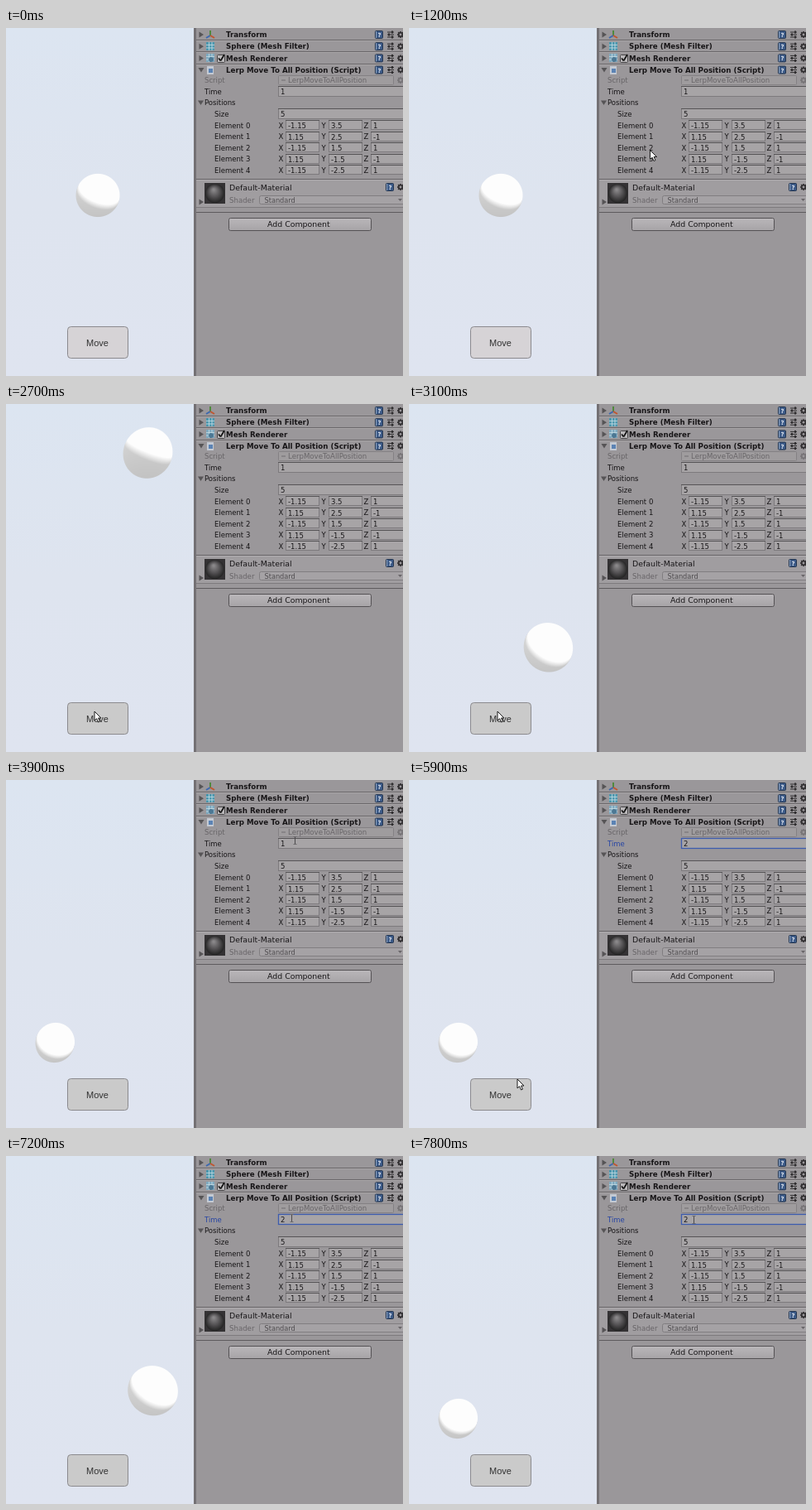
An HTML page with a canvas for the animation above (8000 ms loop, 480 by 420 pixels).

```html
<!DOCTYPE html>
<html lang="en">
<head>
<meta charset="utf-8">
<title>Inspector and moving ball</title>
<style>
  html, body { margin: 0; width: 100%; height: 100%; overflow: hidden; background: #dee4f0; }
  canvas { display: block; }
</style>
</head>
<body>
<canvas id="stage" width="480" height="420"></canvas>
<script>
const ctx = document.getElementById('stage').getContext('2d');
const LOOP = 8000, STEP = 100;
const SANS = '"DejaVu Sans", sans-serif';
const INK = '#171517', DIM = '#686568', PANEL = '#9a979a', BLUE = '#2846a4';

// Camera: focal lengths in pixels, screen centre and distance to the z = 0 plane
const VIEW = { fx: 423, fy: 416.6, cx: 113.5, cy: 200.9, dist: 8 };
const LIGHT = [0.32, 0.77, -0.56];
const START = [-0.047, -0.02, 0];
const POINTS = [[-1.15, 3.5, 1], [1.15, 2.5, -1], [-1.15, 1.5, 1], [1.15, -1.5, -1], [-1.15, -2.5, 1]];
const LAST = POINTS[POINTS.length - 1];
const RUNS = [
  { shown: 2300, begin: 2289, length: 990, from: START },
  { shown: 5900, begin: 5900, length: 1640, from: LAST }
];

// Pointer keys: time, x, y
const POINTER = [
  [400, 387, 200], [600, 300, 203], [800, 242, 215], [1000, 242, 215], [1400, 341, 80],
  [1600, 341, 80], [2200, 107, 371], [3100, 107, 371], [3400, 272, 76], [3600, 300, 58],
  [3900, 349, 73], [4400, 349, 73], [4800, 346, 77], [5400, 350, 77], [5900, 131, 361],
  [6200, 112, 378], [6800, 112, 378], [7200, 345, 75], [7800, 344, 77]
];

const clamp = (v, lo = 0, hi = 1) => Math.min(hi, Math.max(lo, v));
const mix = (a, b, f) => a + (b - a) * f;
const dot = (a, b) => a[0] * b[0] + a[1] * b[1] + a[2] * b[2];

function rect(x, y, w, h, fill) {
  ctx.fillStyle = fill;
  ctx.fillRect(x, y, w, h);
}

function text(str, x, y, size = 8.5, color = INK, weight = '', family = SANS) {
  ctx.font = `${weight} ${size}px ${family}`;
  ctx.fillStyle = color;
  ctx.fillText(str, x, y);
}

function shape(points, fill, stroke, width = 1) {
  ctx.beginPath();
  points.forEach(([x, y]) => ctx.lineTo(x, y));
  ctx.closePath();
  if (fill) { ctx.fillStyle = fill; ctx.fill(); }
  if (stroke) { ctx.strokeStyle = stroke; ctx.lineWidth = width; ctx.stroke(); }
}

function line(x1, y1, x2, y2, color, width = 1) {
  ctx.beginPath();
  ctx.moveTo(x1, y1);
  ctx.lineTo(x2, y2);
  ctx.strokeStyle = color;
  ctx.lineWidth = width;
  ctx.stroke();
}

function disc(x, y, r, fill) {
  ctx.beginPath();
  ctx.arc(x, y, r, 0, 7);
  ctx.fillStyle = fill;
  ctx.fill();
}

function roundBox(x, y, w, h, r, fill, stroke) {
  ctx.beginPath();
  ctx.roundRect(x + 0.5, y + 0.5, w - 1, h - 1, r);
  ctx.fillStyle = fill;
  ctx.fill();
  ctx.strokeStyle = stroke;
  ctx.lineWidth = 1;
  ctx.stroke();
}

function gradient(x0, y0, x1, y1, ...colors) {
  const g = ctx.createLinearGradient(x0, y0, x1, y1);
  colors.forEach((c, i) => g.addColorStop(i / (colors.length - 1), c));
  return g;
}

function ballPosition(t) {
  const run = RUNS.filter(r => t > r.shown).pop();
  if (!run) return START;
  const path = [run.from, ...POINTS];
  const p = clamp((t - run.begin) / run.length) * POINTS.length;
  const i = Math.min(Math.floor(p), POINTS.length - 1);
  return path[i].map((v, k) => mix(v, path[i + 1][k], p - i));
}

// Ray-traced sphere of radius 0.5 with a saturating directional light
function drawBall(pos) {
  const { fx, fy, cx, cy, dist } = VIEW;
  const depth = dist + pos[2];
  const sx = Math.round(cx + pos[0] * fx / depth);
  const sy = Math.round(cy - pos[1] * fy / depth);
  const oc = [-pos[0], -pos[1], -depth];
  const oc2 = dot(oc, oc);
  for (let y = sy - 34; y <= sy + 34; y++) {
    for (let x = sx - 34; x <= sx + 34; x++) {
      const ray = [(x + 0.5 - cx) / fx, (cy - y - 0.5) / fy, 1];
      const a = dot(ray, ray), b = dot(ray, oc);
      const miss = Math.sqrt(Math.max(0, oc2 - b * b / a));
      const alpha = clamp((0.5 - miss) * fx / depth + 0.5);
      if (!alpha) continue;
      const k = (-b - Math.sqrt(Math.max(0, b * b - a * (oc2 - 0.25)))) / a;
      const n = ray.map((v, i) => (oc[i] + v * k) * 2);
      const tone = Math.min(253, 208 + 13 * n[1] + 175 * Math.max(0, dot(n, LIGHT)));
      rect(x, y, 1, 1, `rgba(${tone},${tone},${tone},${alpha})`);
    }
  }
}

function foldArrow(x, y, open) {
  shape(open ? [[x - 3.5, y - 2.5], [x + 3.5, y - 2.5], [x, y + 3]]
             : [[x - 2.5, y - 3.5], [x + 3, y], [x - 2.5, y + 3.5]], '#565456');
}

function book(x, y) {
  roundBox(x - 5, y - 5, 10, 10, 1, '#3d5b88', '#22344f');
  line(x - 3.5, y - 4, x - 3.5, y + 4, '#93a9c6');
  text('?', x - 1.5, y + 3, 7, '#e1e7f0', 'bold');
}

function sliders(x, y) {
  [-3, 0, 3].forEach((dy, i) => {
    line(x - 4, y + dy, x + 4, y + dy, '#302e30');
    rect(x + [1, -3, 1][i], y + dy - 1.5, 2, 3, '#302e30');
  });
}

function gear(x, y, color = '#302e30') {
  for (let i = 0; i < 4; i++) {
    const c = Math.cos(i * Math.PI / 4) * 4, s = Math.sin(i * Math.PI / 4) * 4;
    line(x - c, y - s, x + c, y + s, color, 1.6);
  }
  disc(x, y, 3, color);
  disc(x, y, 1.4, PANEL);
}

function gridIcon(x, y, fill) {
  rect(x - 5, y - 5, 10, 10, fill);
  for (const d of [-1.5, 2]) {
    line(x - 5, y + d, x + 5, y + d, '#c5dce4', 0.8);
    line(x + d, y - 5, x + d, y + 5, '#c5dce4', 0.8);
  }
}

function field(x, y, w, value, h = 12) {
  rect(x, y, w, h, '#7d7a7d');
  rect(x + 1, y + 1, w - 2, h - 2, '#a7a4a6');
  rect(x, y, w, 1, '#565456');
  text(value, x + 3, y + 9.5);
}

function drawHeaders() {
  const titles = ['Transform', 'Sphere (Mesh Filter)', 'Mesh Renderer', 'Lerp Move To All Position (Script)'];
  titles.forEach((title, i) => {
    const y = 8 + i * 14.2;
    if (i) {
      rect(230, Math.round(y - 8), 250, 1, '#6b686b');
      rect(230, Math.round(y - 7), 250, 1, '#a8a5a7');
    }
    foldArrow(236, y, i === 3);
    text(title, 266, y + 3.2, 8.7, INK, 'bold');
    book(451, y);
    sliders(465, y);
    gear(477, y);
  });
  line(247, 9, 247, 3, '#4f8a3c', 2);
  line(247, 9, 242, 12, '#3b68b0', 2);
  line(247, 9, 252, 12, '#c0572f', 2);
  gridIcon(247, 22, '#4d97ae');
  gridIcon(247, 36, '#7fa9bf');
  disc(248, 38, 3, '#4c7894');
  rect(243, 46, 8, 10, '#c4cad3');
  rect(245, 49, 5, 5, '#5b83b4');
  roundBox(255, 32, 10, 10, 1, '#bab8ba', '#454345');
  line(257, 36.5, 259.5, 39.5, '#111', 1.7);
  line(259.5, 39.5, 264, 32, '#111', 1.7);
}

function drawProperties(t) {
  const focused = t >= 4500;
  text('Script', 240, 66.3, 8.5, DIM);
  roundBox(329, 57, 140, 12, 1, '#9f9c9e', '#848184');
  rect(333, 62, 5, 2, '#878487');
  text('LerpMoveToAllPosition', 341, 66.3, 8.6, DIM);
  gear(477, 63, '#777477');

  text('Time', 240, 79.5, 8.5, focused ? BLUE : INK);
  field(329, 70, 155, '', 13);
  if (focused) {
    ctx.strokeStyle = '#3d5cae';
    ctx.lineWidth = 1.3;
    ctx.strokeRect(329.5, 70.5, 155, 12);
  }
  if (t >= 4600 && t < 5000) rect(332, 72, 6, 9, '#7589b8');
  text(t >= 5000 ? '2' : '1', 332, 79.8);

  foldArrow(235.5, 90, true);
  text('Positions', 240, 93.2);
  text('Size', 252, 106.8);
  field(329, 97, 155, '5', 13);

  POINTS.forEach((point, i) => {
    const y = 120.5 + i * 13.5;
    text('Element ' + i, 252, y);
    point.forEach((v, k) => {
      const x = [338, 390, 441][k];
      text('XYZ'[k], x - 8.5, y);
      field(x, Math.round(y - 9.5), 41, String(v));
    });
  });
}

function drawMaterial() {
  rect(230, 182, 250, 1, '#656265');
  rect(230, 183, 250, 33, '#a09da0');
  rect(230, 183, 250, 1, '#b0adb0');
  rect(230, 216, 250, 1, '#7e7b7e');
  rect(230, 222, 250, 1, '#5e5b5e');
  rect(240, 187, 25, 25, '#343234');
  const glow = ctx.createRadialGradient(251, 195, 1, 252.5, 199.5, 12);
  glow.addColorStop(0, '#898789');
  glow.addColorStop(0.5, '#555355');
  glow.addColorStop(1, '#202020');
  disc(252.5, 199.5, 11.5, glow);
  foldArrow(236, 210, false);
  text('Default-Material', 270, 196.3, 9.4);
  book(464, 192);
  gear(477, 192);
  text('Shader', 270, 210.7, 8.6, DIM);
  roundBox(306, 202, 180, 11, 2, '#a5a2a5', '#807d80');
  text('Standard', 312.5, 210.6, 8.2, '#4f4c4f');
  shape([[474, 206], [479, 206], [476.5, 209]], '#696669');

  roundBox(269, 229, 173, 16, 2, gradient(0, 229, 0, 245, '#bab7ba', '#a6a3a6'), '#545154');
  text('Add Component', 316, 240.3, 9.4);
}

function drawScene(t) {
  rect(0, 0, 227, 420, gradient(0, 0, 0, 420, '#dce5f1', '#dee4ef', '#dfe4f0'));
  drawBall(ballPosition(t));
  roundBox(74, 360, 74, 39, 4, t > 2300 ? '#cacaca' : '#d6d3d6', '#8b8a8e');
  text('Move', 97, 383.5, 11, '#323232', '', '"Liberation Sans", sans-serif');
}

function drawPanel(t) {
  rect(227, 0, 253, 420, PANEL);
  rect(227, 0, 3, 420, '#747174');
  drawHeaders();
  drawProperties(t);
  drawMaterial();
}

function drawPointer(t) {
  if (t < 400 || (t >= 5000 && t < 5500)) return;
  const i = Math.max(1, POINTER.findIndex(k => k[0] >= t));
  const last = POINTER[POINTER.length - 1];
  const [t0, x0, y0] = t > last[0] ? last : POINTER[i - 1];
  const [t1, x1, y1] = t > last[0] ? last : POINTER[i];
  const f = t1 > t0 ? clamp((t - t0) / (t1 - t0)) : 1;
  const x = mix(x0, x1, f), y = mix(y0, y1, f);
  if (x > 329 && y >= 70 && y <= 83) {
    const bx = Math.round(x) + 0.5;
    line(bx, y - 4, bx, y + 4, '#4b494b');
    line(bx - 2, y - 4.5, bx + 2, y - 4.5, '#6b696b');
    line(bx - 2, y + 4.5, bx + 2, y + 4.5, '#6b696b');
    return;
  }
  const outline = [[0, 0], [0, 11], [2.6, 8.7], [4.5, 13], [6.4, 12.2], [4.6, 8], [8, 8]];
  shape(outline.map(([dx, dy]) => [x + dx, y + dy]), '#fff', '#1b1b1b');
}

let origin;
function frame(now) {
  origin ??= now;
  const t = Math.floor(((now - origin + 5) % LOOP) / STEP) * STEP;
  drawScene(t);
  drawPanel(t);
  drawPointer(t);
  requestAnimationFrame(frame);
}
requestAnimationFrame(frame);
</script>
</body>
</html>
```
